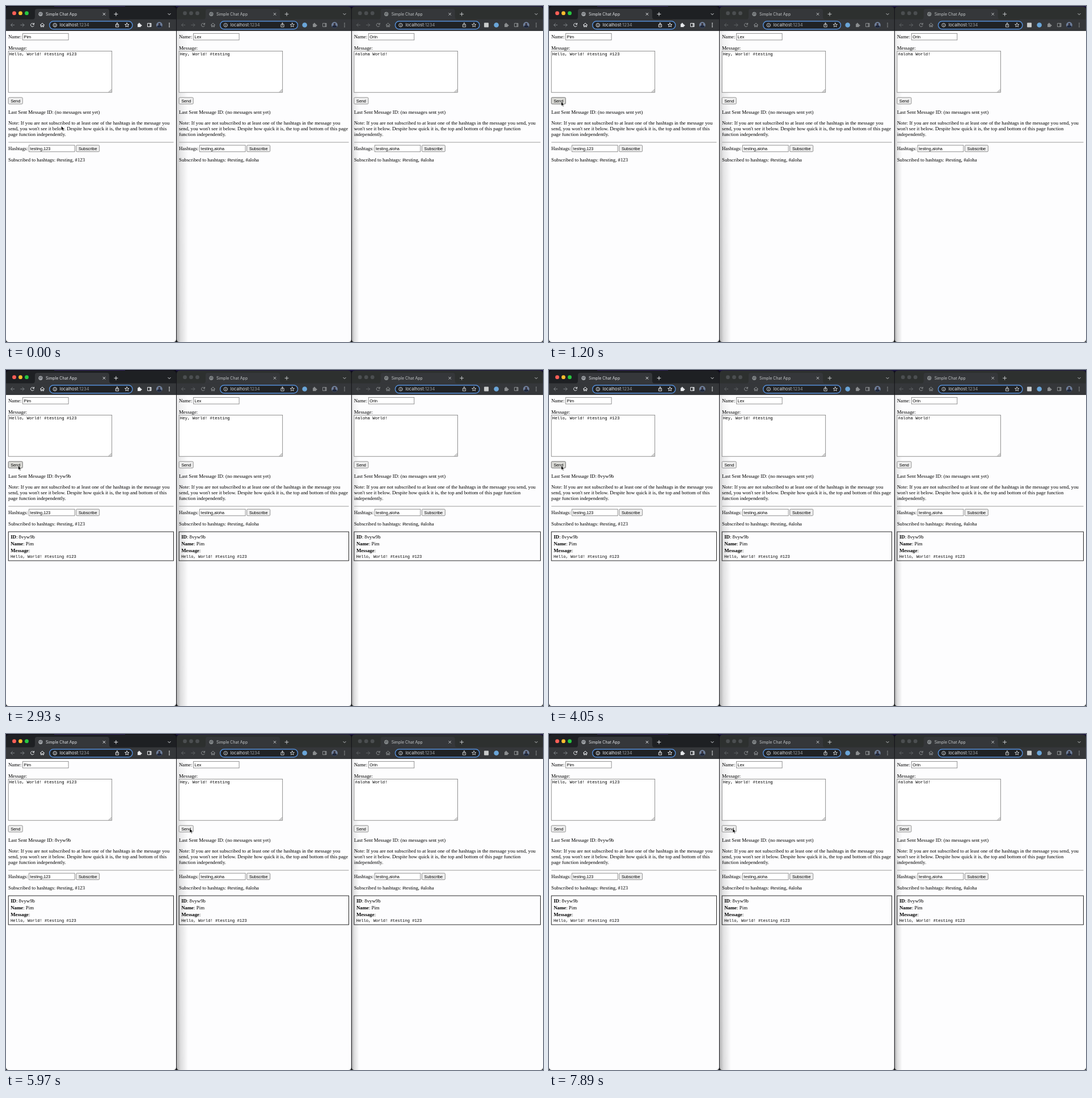
Animation of 947 by 592 pixels, one loop 7990 ms. Source, as an HTML page:

```html
<!DOCTYPE html>
<html lang="en">
<head>
<meta charset="utf-8">
<title>Simple Chat App</title>
<style>
html, body { margin: 0; width: 100%; height: 100%; overflow: hidden; background: #0d0b17; }
svg { display: block; width: 947px; height: 592px; }
text { white-space: pre; }
.serif { font: 8.8px "Liberation Serif", serif; fill: #000; }
.sans { font: 7.33px "Liberation Sans", sans-serif; fill: #000; }
.mono { font: 7.33px "Liberation Mono", monospace; fill: #000; }
.pre { font-size: 7.15px; }
.tab { font: 7px Inter, sans-serif; }
.url { font: 7.6px Inter, sans-serif; }
.bold { font-weight: bold; }
.field { fill: #fff; stroke: #767676; stroke-width: .8; }
.button { fill: #efefef; stroke: #767676; stroke-width: .8; }
.hover { fill: #dcdcd8; stroke: #4c4c4c; }
.line { fill: none; stroke-width: 1; stroke-linecap: round; stroke-linejoin: round; }
</style>
</head>
<body>
<svg id="stage" viewBox="0 0 947 592">
  <defs>
    <linearGradient id="shade">
      <stop offset="0" stop-color="#000" stop-opacity=".3"/>
      <stop offset=".35" stop-color="#000" stop-opacity=".13"/>
      <stop offset="1" stop-color="#000" stop-opacity="0"/>
    </linearGradient>
    <linearGradient id="fall" x2="0" y2="1">
      <stop offset="0" stop-color="#fff" stop-opacity=".2"/>
      <stop offset=".5" stop-color="#fff" stop-opacity=".75"/>
      <stop offset="1" stop-color="#fff"/>
    </linearGradient>
    <mask id="fade"><rect width="947" height="592" fill="url(#fall)"/></mask>
  </defs>
  <rect width="947" height="592" fill="#0d0b17"/>
  <rect x="85" width="125" height="2" fill="#2b1a58"/>
  <rect x="300" width="647" height="2" fill="#1c1440"/>
  <g id="windows"></g>
  <path id="cursor" d="M0 0V7.6L1.8 6L3.1 8.8L4.4 8.2L3.1 5.5H5.5Z" fill="#000" stroke="#fff" stroke-width=".6"/>
</svg>
<script>
const LOOP = 7990, SENT_AT = 1500;
const SENDER = 'Pim', SENT_ID = '8vyw9b', NONE = '(no messages sent yet)';
const HELLO = 'Hello, World! #testing #123';

const windows = [
  { x: 0, right: 300, name: SENDER, message: HELLO, tags: ['testing', '123'], active: true, extras: [],
    note: ["Note: If you are not subscribed to at least one of the hashtags in the message you",
           "send, you won't see it below. Despite how quick it is, the top and bottom of this",
           "page function independently."] },
  { x: 301, right: 609, name: 'Lex', message: 'Hey, World! #testing', tags: ['testing', 'aloha'], extras: ['disc'], shade: 20,
    note: ["Note: If you are not subscribed to at least one of the hashtags in the message you",
           "send, you won't see it below. Despite how quick it is, the top and bottom of this page",
           "function independently."] },
  { x: 609.7, right: 947, name: 'Orin', message: '#aloha World!', tags: ['testing', 'aloha'], extras: ['square', 'disc'], shade: 13,
    note: ["Note: If you are not subscribed to at least one of the hashtags in the message you send, you",
           "won't see it below. Despite how quick it is, the top and bottom of this page function",
           "independently."] }
];

// time, x, y
const cursorPath = [[0, 97.5, 211.5], [120, 96, 210], [540, 42, 170], [800, 21.5, 168.5],
                    [5000, 21.5, 168.5], [5350, 190, 172], [5700, 324, 166.5], [LOOP, 324, 166.5]];
const HOVER = [800, 5030];

const text = (x, y, kind, body, attrs = '') => `<text x="${x}" y="${y}" class="${kind}" ${attrs}>${body}</text>`;
const box = (x, y, w, h, kind, rx = 0, attrs = '') =>
  `<rect x="${x}" y="${y}" width="${w}" height="${h}" rx="${rx}" class="${kind}" ${attrs}/>`;
const dot = (x, y, r, fill) => `<circle cx="${x}" cy="${y}" r="${r}" fill="${fill}"/>`;
const icon = (x, y, d, color) => `<path class="line" transform="translate(${x} ${y})" d="${d}" stroke="${color}"/>`;

const shapes = {
  back: 'M3.2 0H-3M0 -3L-3 0L0 3',
  forward: 'M-3.2 0H3M0 -3L3 0L0 3',
  reload: 'M2.7 1.3A3 3 0 1 1 2.2 -2.1M3 -3.3V-1.1H.8',
  home: 'M-3.6 0L0 -3.4L3.6 0M-2.5 -.8V3.2H-.8V.8H.8V3.2H2.5V-.8',
  info: 'M3.2 0A3.2 3.2 0 1 1 -3.2 0A3.2 3.2 0 1 1 3.2 0M0 -.2V1.5M0 -1.6V-1.5',
  share: 'M-1.2 -1H-2.6V3.4H2.6V-1H1.2M0 1V-3.8M-1.5 -2.4L0 -3.8L1.5 -2.4',
  panel: 'M-3 -3H3V3H-3ZM1 -3V3M2 -3V3',
  close: 'M-1.9 -1.9L1.9 1.9M1.9 -1.9L-1.9 1.9',
  plus: 'M-3 0H3M0 -3V3',
  chevron: 'M-2.2 -1L0 1.2L2.2 -1'
};

const star = Array.from({ length: 10 }, (_, i) => {
  const r = i % 2 ? 1.7 : 3.9, a = i * Math.PI / 5;
  return `${i ? 'L' : 'M'}${(r * Math.sin(a)).toFixed(2)} ${(-r * Math.cos(a)).toFixed(2)}`;
}).join('') + 'Z';

const puzzle = (x, color) => `<g transform="translate(${x} 33.5)" fill="${color}">
  <path d="M-3.4 -2H2.2V3.6H-3.4Z"/>${dot(-.6, -2.5, 1.3, color)}${dot(2.7, .8, 1.3, color)}</g>`;

const avatar = x => `<g transform="translate(${x} 33.5)">${dot(0, 0, 5.4, '#70809c')}
  <path d="M-4.4 3.1Q-3.6 .2 0 .2T4.4 3.1A5.4 5.4 0 0 1 -4.4 3.1Z" fill="#20283c"/>${dot(0, -1.6, 2, '#38323a')}</g>`;

function chrome({ x, right, active, extras }) {
  const bright = active ? '#e8eaed' : '#8b8e90', dim = active ? '#7c8084' : '#5e6264';
  const label = active ? '#e3e5e8' : '#c3c6c8', strip = active ? '#1e2023' : '#2d302f';
  const lights = active ? ['#fe5f57', '#febc2e', '#28c840'] : Array(3).fill('#4b4e50');
  const menu = right - 12, urlRight = menu - 65 - 17.5 * extras.length;
  const at = (shape, px, py, color) => icon(px, py, shapes[shape], color);
  let out = `<path d="M${x} 592V7Q${x} 1 ${x + 6} 1H${right - 6}Q${right} 1 ${right} 7V592Z" fill="${strip}"/>`;
  out += `<path d="M${x + 46} 24Q${x + 51} 24 ${x + 51} 19V9Q${x + 51} 5 ${x + 55} 5H${x + 178}Q${x + 182} 5 ${x + 182} 9V19Q${x + 182} 24 ${x + 187} 24Z" fill="#35373a"/>`;
  out += box(x, 23.5, right - x, 20.5, '', 0, 'fill="#35373a"');
  out += lights.map((c, i) => dot(x + 14.5 + 11 * i, 12.7, 3.4, c)).join('');
  out += dot(x + 61, 14.3, 3.7, active ? '#a4a8ac' : '#85898b');
  out += icon(x + 61, 14.3, 'M-2.4 -1.2L-.4 -.4L-1 1.3M.8 -2.3L1 -.7L2.4 .3', '#4b4e52');
  out += text(x + 70, 16.9, 'tab', 'Simple Chat App', `fill="${label}"`);
  out += at('close', x + 173, 14.3, label) + at('plus', x + 194, 14.3, label) + at('chevron', menu, 14.3, label);
  out += at('back', x + 11.5, 33.5, dim) + at('forward', x + 29, 33.5, dim);
  out += at('reload', x + 46.5, 33.5, bright) + at('home', x + 64, 33.5, bright);
  out += box(x + 76.7, 26.7, urlRight - x - 76.7, 14, '', 7, 'fill="#202225" stroke="#568fd8" stroke-width="1.4"');
  out += at('info', x + 86.3, 33.7, label);
  out += text(x + 94.7, 36.4, 'url', 'localhost<tspan fill="#9a9ea2">:1234</tspan>', `fill="${active ? '#e8eaed' : '#d5d7d9'}"`);
  out += at('share', urlRight - 27, 33.5, label) + icon(urlRight - 9.7, 33.7, star, label);
  extras.forEach((kind, i) => {
    const px = menu - 52.7 - 17.6 * (extras.length - i);
    out += kind === 'disc' ? dot(px, 33.5, 4.3, '#6aa5d8') : box(px - 4, 29.5, 8, 8, '', 1, 'fill="#c9cbcb"');
  });
  out += puzzle(menu - 52.5, bright) + at('panel', menu - 35, 33.5, bright) + avatar(menu - 17.6);
  return out + [-3, 0, 3].map(d => dot(menu, 33.5 + d, .9, bright)).join('');
}

function receipt(x, width) {
  const row = (y, key, value) => text(x + 4, y, 'serif', `<tspan class="bold">${key}</tspan>: ${value}`);
  return `<g class="receipt">${box(x, 285, width, 51, '', 0, 'fill="none" stroke="#111" stroke-width=".9"')}
    ${row(297, 'ID', SENT_ID)}${row(309, 'Name', SENDER)}${row(320.8, 'Message', '')}
    ${text(x + 3.8, 331.4, 'mono pre', HELLO)}</g>`;
}

function page({ x, right, name, message, tags, note, active, shade }) {
  const left = x + 4.2, width = right - x - 8.7;
  const button = (px, py, w, label, id = '') =>
    box(px, py, w, 11.5, 'button', 1.5, id) + text(px + w / 2, py + 8.3, 'sans', label, 'text-anchor="middle"');
  const field = (px, py, value) => box(px, py, 80.5, 11.6, 'field') + text(px + 2, py + 8.4, 'sans', value);
  let out = `<path d="M${x} 44H${right}V587Q${right} 592 ${right - 5} 592H${x + 5}Q${x} 592 ${x} 587Z" fill="#fdfdfe"/>`;
  if (shade) out += box(x, 44, shade, 548, '', 0, 'fill="url(#shade)" mask="url(#fade)"');
  out += text(left - .2, 57, 'serif', 'Name:') + field(x + 29.6, 48.3, name);
  out += text(left - .2, 77, 'serif', 'Message:') + box(left, 79.4, 182.5, 72.8, 'field');
  out += text(left + 1.6, 87.3, 'mono', message);
  out += icon(x + 184, 149.8, 'M-2.8 1.8L1.8 -2.8M-.3 1.8L1.8 -.3', '#888');
  out += button(left, 161.2, 25, 'Send', active ? 'id="send"' : '');
  out += text(left - .2, 190, 'serif', `Last Sent Message ID: <tspan ${active ? 'id="last"' : ''}>${NONE}</tspan>`);
  out += note.map((line, i) => text(left - .2, 208.8 + 10 * i, 'serif', line)).join('');
  out += box(left, 239.6, width, 1, '', 0, 'fill="#9c9c9c"');
  out += text(left - .2, 253.8, 'serif', 'Hashtags:') + field(x + 40.6, 245.2, tags.join(','));
  out += button(x + 123.7, 245.2, 41, 'Subscribe');
  out += text(left - .2, 274, 'serif', 'Subscribed to hashtags: ' + tags.map(t => '#' + t).join(', '));
  return out + receipt(left, width);
}

const $ = id => document.getElementById(id);
$('windows').innerHTML = windows.map(w => chrome(w) + page(w)).join('') +
  [300, 608.8].map(x => box(x, 3, .9, 589, '', 0, 'fill="#17171b"')).join('');
const receipts = document.querySelectorAll('.receipt');

function cursorAt(t) {
  const i = cursorPath.findIndex(p => p[0] > t);
  const [t0, x0, y0] = cursorPath[i - 1], [t1, x1, y1] = cursorPath[i];
  const k = (t - t0) / (t1 - t0);
  return [x0 + (x1 - x0) * k, y0 + (y1 - y0) * k];
}

function draw(now) {
  const t = now % LOOP, sent = t >= SENT_AT;
  $('cursor').setAttribute('transform', `translate(${cursorAt(t)})`);
  $('send').classList.toggle('hover', t >= HOVER[0] && t < HOVER[1]);
  $('last').textContent = sent ? SENT_ID : NONE;
  receipts.forEach(r => r.setAttribute('visibility', sent ? 'visible' : 'hidden'));
}

const start = performance.now();
function tick() {
  draw(performance.now() - start);
  requestAnimationFrame(tick);
}
tick();
</script>
</body>
</html>
```
